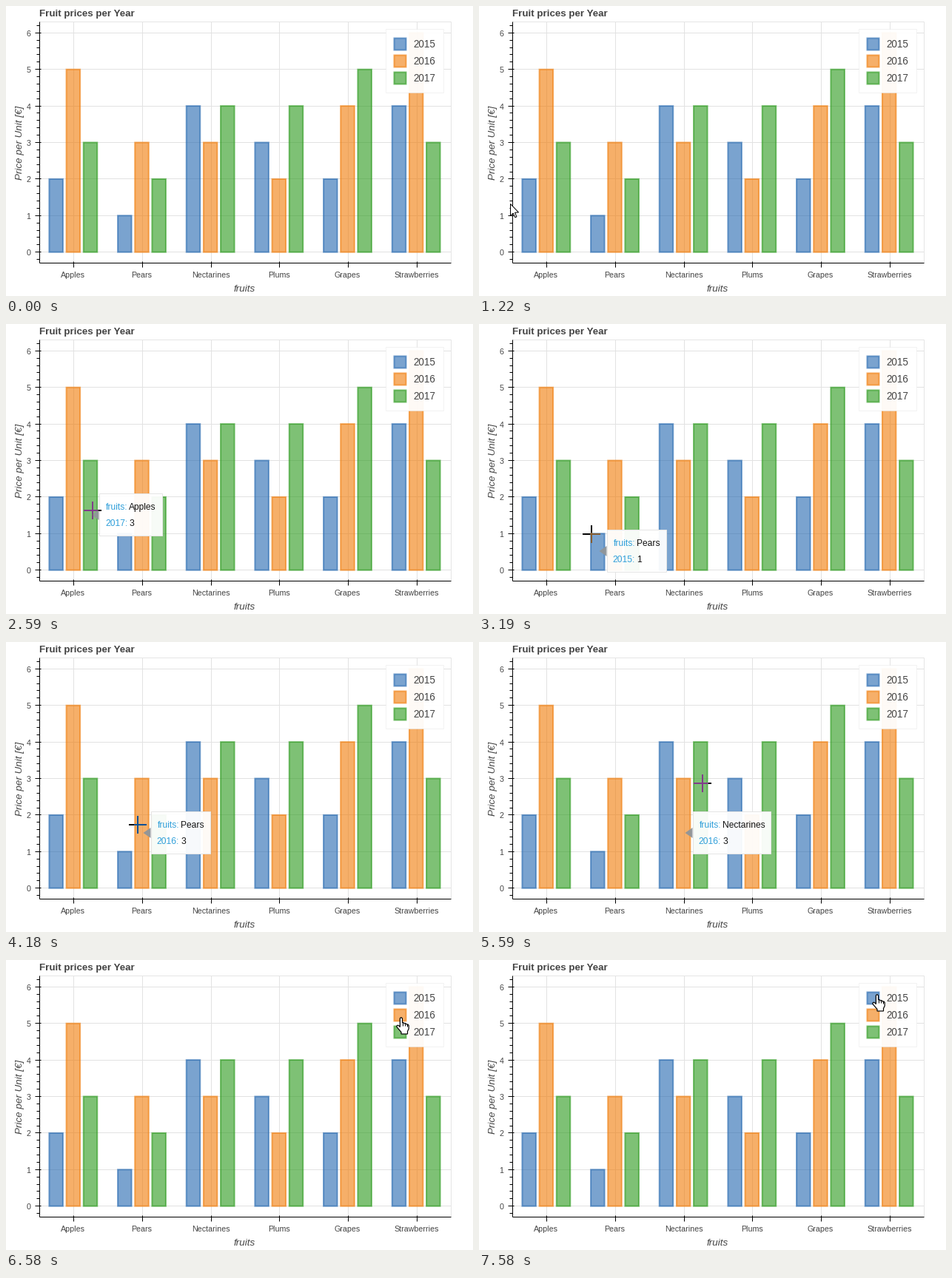
These frames come from a looping animation (631x392 px, 8000 ms). A matplotlib script:

```python
import matplotlib.pyplot as plt
import numpy as np
from matplotlib.animation import FuncAnimation
from matplotlib.collections import LineCollection
from matplotlib.colors import to_rgb
from matplotlib.patches import Polygon, Rectangle
from matplotlib.path import Path

W, H, DPI = 631, 392, 72          # at 72 dpi one point is one pixel
LOOP, STEP = 8000, 40

LEFT, RIGHT, TOP, BOTTOM = 44.5, 600.5, 21.5, 347.5
FRUITS = ["Apples", "Pears", "Nectarines", "Plums", "Grapes", "Strawberries"]
YEARS = ["2015", "2016", "2017"]
PRICES = {"2015": [2, 1, 4, 3, 2, 4],
          "2016": [5, 3, 3, 2, 4, 6],
          "2017": [3, 2, 4, 4, 5, 3]}
COLORS = dict(zip(YEARS, ["#2166af", "#f07a05", "#289919"]))
ALPHA = 0.6
GRID, INK = "#e2e2e2", "#444444"
TIP_WIDTH = {"Apples": 85, "Pears": 80, "Nectarines": 105, "Plums": 82, "Grapes": 88}

# start time, cursor, x, y, hovered bar
STEPS = [
    (0, None, 0, 0, None),
    (1220, "arrow", 42, 267, None),
    (1400, "cross", 66, 261, ("Apples", "2015")),
    (1600, "cross", 73, 259, ("Apples", "2015")),
    (1810, "cross", 86, 254, ("Apples", "2016")),
    (2010, "cross", 88, 254, ("Apples", "2016")),
    (2200, "cross", 106, 251, ("Apples", "2017")),
    (2420, "cross", 114, 251, ("Apples", "2017")),
    (2590, "cross", 117, 252, ("Apples", "2017")),
    (2810, "cross", 119, 253, ("Apples", "2017")),
    (3000, "cross", 139, 276, None),
    (3190, "cross", 152, 284, ("Pears", "2015")),
    (3390, "cross", 159, 292, ("Pears", "2015")),
    (3600, "cross", 159, 293, ("Pears", "2015")),
    (3790, "cross", 172, 270, None),
    (3980, "cross", 177, 250, ("Pears", "2016")),
    (4180, "cross", 178, 247, ("Pears", "2016")),
    (5590, "cross", 302, 191, ("Nectarines", "2016")),
    (5790, "cross", 421, 118, ("Plums", "2017")),
    (5990, "cross", 490, 93, ("Grapes", "2017")),
    (6200, "hand", 513, 84, None),
    (6390, "hand", 525, 78, None),
    (6580, "hand", 527, 77, None),
    (7390, "hand", 530, 59, None),
    (7580, "hand", 531, 46, None),
]

plt.rcParams["font.family"] = "Liberation Sans"
fig = plt.figure(figsize=((W + 0.001) / DPI, (H + 0.001) / DPI), dpi=DPI, facecolor="white")
ax = fig.add_axes([0, 0, 1, 1])
ax.set(xlim=(0, W), ylim=(H, 0))
ax.axis("off")


def x_pos(slot):
    return LEFT + slot * (RIGHT - LEFT) / len(FRUITS)


def y_pos(value):
    return BOTTOM - (value + 0.3) * (BOTTOM - TOP) / 6.6


def crisp(v):
    return round(v - 0.5) + 0.5


def bar_center(fruit, year):
    return x_pos(FRUITS.index(fruit) + 0.5 + 0.25 * (YEARS.index(year) - 1))


def label(x, y, s, size=10.67, color=INK, **kw):
    return ax.text(x, y, s, fontsize=size, color=color, **kw)


def lines(segments, color, z):
    ax.add_collection(LineCollection(segments, colors=color, linewidths=1, zorder=z))


def box(x, y, w, h, z, **kw):
    return ax.add_patch(Rectangle((x, y), w, h, zorder=z, **kw))


def glyph(x, y, w, h, year, z):
    shade = to_rgb(COLORS[year]) + (ALPHA,)
    box(x, y, w, h, z, fc=shade, ec=shade, lw=2, snap=False)


def rect_path(x0, y0, x1, y1):
    return Path([(x0, y0), (x1, y0), (x1, y1), (x0, y1), (x0, y0)], closed=True)


def draw_chart():
    xs = [crisp(x_pos(i + 0.5)) for i in range(len(FRUITS))]
    ys = [crisp(y_pos(v)) for v in range(7)]
    minor = [crisp(y_pos(k / 5)) for k in range(-1, 32)]

    lines([[(x, TOP), (x, BOTTOM)] for x in xs], GRID, 1)
    lines([[(LEFT, y), (RIGHT, y)] for y in ys], GRID, 1)
    box(LEFT, TOP, RIGHT - LEFT, BOTTOM - TOP, 1, fc="none", ec="#e5e5e5", lw=1)

    clips = {}
    bar_w = 0.2 * (x_pos(1) - x_pos(0))
    for year in YEARS:
        paths = []
        for fruit, price in zip(FRUITS, PRICES[year]):
            x, y, base = bar_center(fruit, year) - bar_w / 2, y_pos(price), y_pos(0)
            glyph(x, y, bar_w, base - y, year, 2)
            paths.append(rect_path(x - 1, y - 1, x + bar_w + 1, base + 1))
        clips[year] = Path.make_compound_path(*paths)

    lines([[(LEFT, TOP), (LEFT, BOTTOM)], [(LEFT, BOTTOM), (RIGHT, BOTTOM)]], "black", 3)
    lines([[(x, BOTTOM - 2), (x, BOTTOM + 6)] for x in xs], "black", 3)
    lines([[(LEFT - 6, y), (LEFT + 2, y)] for y in ys], "black", 3)
    lines([[(LEFT - 4, y), (LEFT, y)] for y in minor], "black", 3)

    for x, fruit in zip(xs, FRUITS):
        label(x, 367, fruit, ha="center")
    for v, y in enumerate(ys):
        label(33.5, y + 4, str(v), ha="right")
    label(44.5, 14, "Fruit prices per Year", 13.33, weight="bold")
    label(322.5, 386, "fruits", 13.33, style="italic", ha="center")
    label(21.5, 184.5, "Price per Unit [€]", 13.33, style="italic", rotation=90,
          rotation_mode="anchor", ha="center", va="baseline")

    box(512.5, 31.5, 78, 86, 4, fc=(1, 1, 1, 0.95), ec=(0.9, 0.9, 0.9, 0.5), lw=1)
    for i, year in enumerate(YEARS):
        glyph(524.5, 43.5 + 23 * i, 16, 16, year, 5)
        label(550.3, 56 + 23 * i, year, 13.5, zorder=5)
    return clips


bar_clips = draw_chart()

# Tooltip
tip_arrow = ax.add_patch(Polygon([(0, 0)] * 3, fc="#909599", lw=0, alpha=0.95, zorder=6))
tip_box = box(0, 0, 1, 57, 6, fc=(1, 1, 1, 0.95), ec="#e5e5e5", lw=1)
tip_keys = [label(0, 0, "", 12, "#2f9fda", ha="right", zorder=7) for _ in range(2)]
tip_values = [label(0, 0, "", 12, "#111111", zorder=7) for _ in range(2)]
tip_parts = [tip_arrow, tip_box, *tip_keys, *tip_values]

# Crosshair that inverts what lies below it
PLUS = np.array([(-12, -1), (-1, -1), (-1, -12), (1, -12), (1, -1), (12, -1),
                 (12, 1), (1, 1), (1, 12), (-1, 12), (-1, 1), (-12, 1)])


def make_cross(color, clip=None):
    patch = ax.add_patch(Polygon(PLUS, fc=color, lw=0, zorder=8))
    if clip is not None:
        patch.set_clip_path(clip, ax.transData)
    return patch


def inverted(color):
    return tuple(ALPHA * (1 - c) for c in to_rgb(color))


crosses = [make_cross("black")]
crosses += [make_cross(inverted(COLORS[year]), bar_clips[year]) for year in YEARS]
cross_on_arrow = make_cross("#6f6a66")
cross_on_box = make_cross("#040404")

ARROW = np.array([(0, 0), (0, 16), (3.7, 12.6), (6.3, 18.3), (8.4, 17.4),
                  (6, 11.7), (11, 11.5)]) + 0.5
HAND = np.array([(5.4, 2), (6.2, 0.9), (7.6, 0.9), (8.5, 2), (8.5, 8), (10, 7.6),
                 (11.5, 9), (13, 8.6), (14.5, 10.2), (16, 10), (17.2, 11.5),
                 (17.2, 16), (15.5, 19.5), (15.5, 23), (7, 23), (7, 20.5),
                 (4, 17), (1, 13.5), (1, 12), (2.5, 11.2), (4, 12), (5.4, 13.6)])
FINGERS = np.array([[(8.5, 8), (8.5, 12)], [(11.5, 9), (11.5, 12.5)], [(14.5, 10), (14.5, 13)]])

pointer = ax.add_patch(Polygon(ARROW, fc="white", ec="black", lw=1, zorder=8))
hand = ax.add_patch(Polygon(HAND, fc="white", ec="black", lw=1.2, zorder=8))
fingers = LineCollection(FINGERS, colors="black", linewidths=1, zorder=9)
ax.add_collection(fingers)


def show_tip(hover):
    for part in tip_parts:
        part.set_visible(hover is not None)
    if hover is None:
        return
    fruit, year = hover
    price = PRICES[year][FRUITS.index(fruit)]
    width = TIP_WIDTH[fruit]
    cx = int(bar_center(fruit, year) - 0.01)
    cy = int(y_pos(price / 2))
    on_right = cx < (LEFT + RIGHT) / 2
    x = cx + 12.5 if on_right else cx - 10.5 - width
    y = cy - 28.5
    edge, tip = (x, x - 10) if on_right else (x + width, x + width + 10)
    tip_arrow.set_xy([(edge, cy - 7), (tip, cy), (edge, cy + 7)])
    tip_box.set_bounds(x, y, width, 57)
    rows = [("fruits:", fruit), (year + ":", str(price))]
    for i, (key, value) in enumerate(rows):
        base = y + 21.5 + 22 * i
        tip_keys[i].set(text=key, position=(x + 38.7, base))
        tip_values[i].set(text=value, position=(x + 40.5, base))
    cross_on_arrow.set_clip_path(Path([*tip_arrow.get_xy()]), ax.transData)
    cross_on_box.set_clip_path(rect_path(x, y, x + width, y + 57), ax.transData)


def update(i):
    now = (i + 1) * STEP - 1
    _, kind, x, y, hover = [s for s in STEPS if s[0] <= now][-1]
    show_tip(hover)
    for patch in crosses:
        patch.set_visible(kind == "cross")
        patch.set_xy(PLUS + (x, y))
    for patch in (cross_on_arrow, cross_on_box):
        patch.set_visible(kind == "cross" and hover is not None)
        patch.set_xy(PLUS + (x, y))
    pointer.set_visible(kind == "arrow")
    pointer.set_xy(ARROW + (x, y))
    hand.set_visible(kind == "hand")
    hand.set_xy(HAND + (x, y))
    fingers.set_visible(kind == "hand")
    fingers.set_segments(FINGERS + (x, y))
    return []


anim = FuncAnimation(fig, update, frames=LOOP // STEP, interval=STEP,
                     init_func=lambda: update(0), repeat=True, repeat_delay=0)
plt.show()
```
